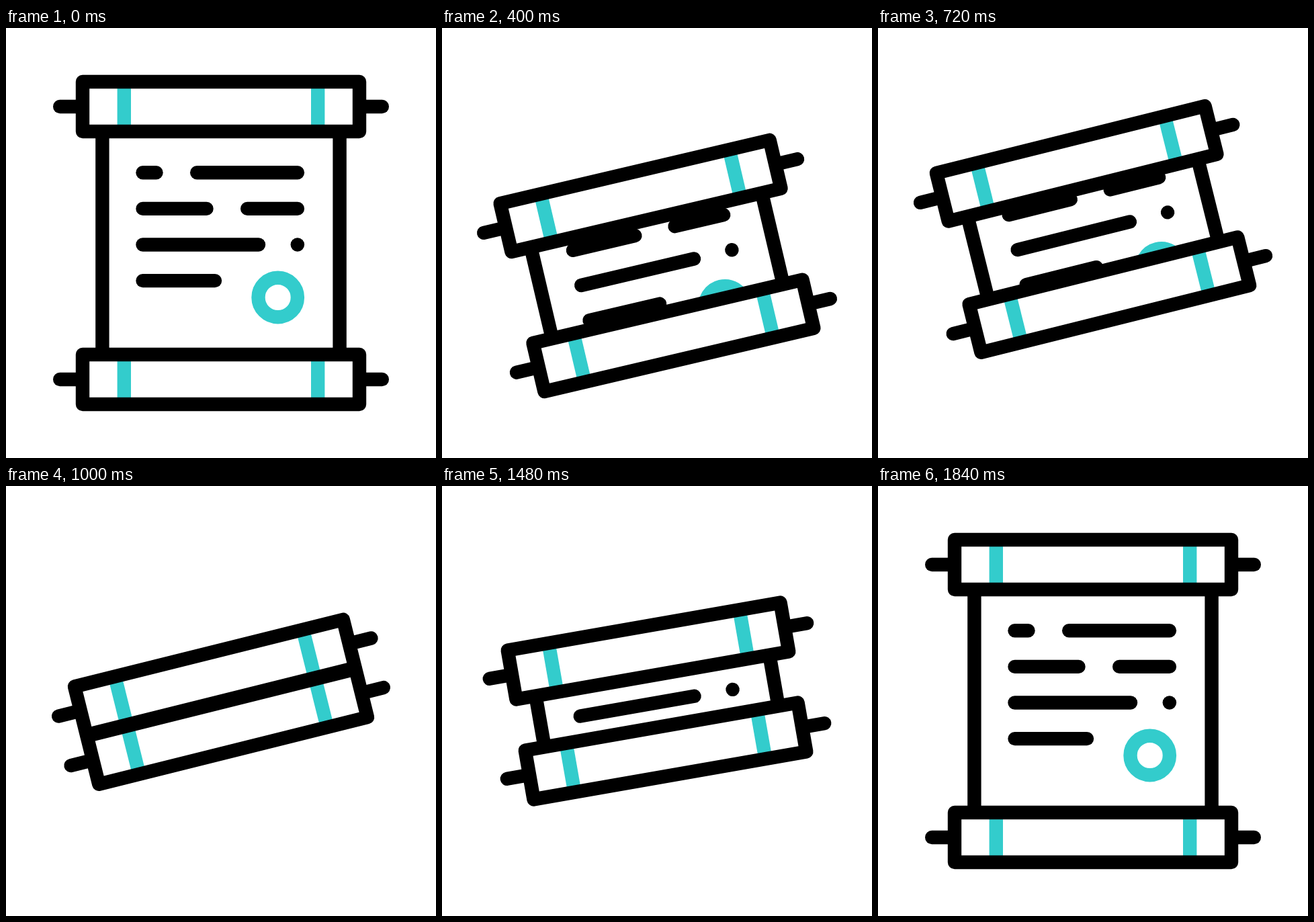
Animation, 640 px wide and 640 px high, one loop 2 s. Source, as an HTML page with a canvas:

```html
<!DOCTYPE html>
<html lang="en">
<head>
<meta charset="utf-8">
<title>Scroll</title>
<style>
  html, body { margin: 0; width: 100%; height: 100%; overflow: hidden; background: #fff; }
  canvas { display: block; width: 100vw; height: 100vh; }
</style>
</head>
<body>
<canvas id="stage" width="640" height="640"></canvas>
<script>
const ctx = document.getElementById('stage').getContext('2d');
const LOOP = 2000, STEP = 40;
const INK = '#000', TEAL = '#33cccc', PAPER = '#fff', LINE = 20.4;
const ROLL = { halfWidth: 206, halfHeight: 37, handle: 239.8, band: 144.2 };
const TEXT = { left: -116.5, right: 113.9, top: -104.7, leading: 53.6, gap: 60.7 };

// Progress 0..1 from start to end along a cubic bezier with flat ends.
function move(t, start, end, out = 1 / 3, into = 2 / 3) {
  const x = Math.min(1, Math.max(0, (t - start) / (end - start)));
  let lo = 0, hi = 1;
  for (let i = 0; i < 24; i++) {
    const u = (lo + hi) / 2, v = 1 - u;
    if (3 * u * v * v * out + 3 * u * u * v * into + u * u * u < x) lo = u; else hi = u;
  }
  const u = x === 0 ? 0 : hi;
  return u * u * (3 - 2 * u);
}

// Three beats close the scroll (dip, jump, snap shut); one long beat opens it.
function pose(t) {
  const jump = move(t, 440, 720), snap = move(t, 720, 1000);
  return {
    tilt: -14 * (move(t, 160, 440) - move(t, 1280, 1840)),
    spread: 203 - 100.2 * move(t, 160, 440, 0.333, 0.584) - 2.2 * jump - 62.7 * snap
      + 165.1 * move(t, 1280, 1840, 0.59, 0.333),
    y: 320 + 34.6 * move(t, 160, 440, 0.333, 0.396) - 55.1 * jump + 21.8 * snap
      - 1.3 * move(t, 1280, 1480)
  };
}

function segment(x1, y1, x2, y2) {
  ctx.beginPath();
  ctx.moveTo(x1, y1);
  ctx.lineTo(x2, y2);
  ctx.stroke();
}

// Each row runs the full width with one gap; the last row stops at its gap.
function drawText() {
  [-96.5, -21.5, 56, -9].forEach((gapStart, row, rows) => {
    const y = TEXT.top + row * TEXT.leading;
    segment(TEXT.left, y, gapStart, y);
    if (row < rows.length - 1) {
      segment(Math.min(gapStart + TEXT.gap, TEXT.right - 0.1), y, TEXT.right, y);
    }
  });
}

function drawSheet(spread) {
  ctx.save();
  ctx.beginPath();
  ctx.rect(-200, -spread, 400, 2 * spread);
  ctx.clip();
  ctx.strokeStyle = INK;
  for (const x of [-176.6, 176.6]) segment(x, -spread, x, spread);
  drawText();
  ctx.strokeStyle = TEAL;
  ctx.beginPath();
  ctx.arc(84.7, 81, 29.2, 0, 2 * Math.PI);
  ctx.stroke();
  ctx.restore();
}

function drawRoll(y) {
  const { halfWidth, halfHeight, handle, band } = ROLL;
  const box = [-halfWidth, y - halfHeight, 2 * halfWidth, 2 * halfHeight];
  ctx.strokeStyle = INK;
  segment(-handle, y, handle, y);
  ctx.fillStyle = PAPER;
  ctx.fillRect(...box);
  ctx.fillStyle = TEAL;
  for (const x of [-band, band]) ctx.fillRect(x - LINE / 2, y - halfHeight, LINE, 2 * halfHeight);
  ctx.strokeRect(...box);
}

function draw(t) {
  const { tilt, spread, y } = pose(t);
  ctx.setTransform(1, 0, 0, 1, 0, 0);
  ctx.fillStyle = PAPER;
  ctx.fillRect(0, 0, 640, 640);
  ctx.translate(320, y);
  ctx.rotate(tilt * Math.PI / 180);
  ctx.lineWidth = LINE;
  ctx.lineCap = ctx.lineJoin = 'round';
  drawSheet(spread);
  drawRoll(-spread);
  drawRoll(spread);
}

function tick() {
  const t = performance.now() % LOOP;
  draw(Math.floor(t / STEP) * STEP);
  requestAnimationFrame(tick);
}
tick();
</script>
</body>
</html>
```
